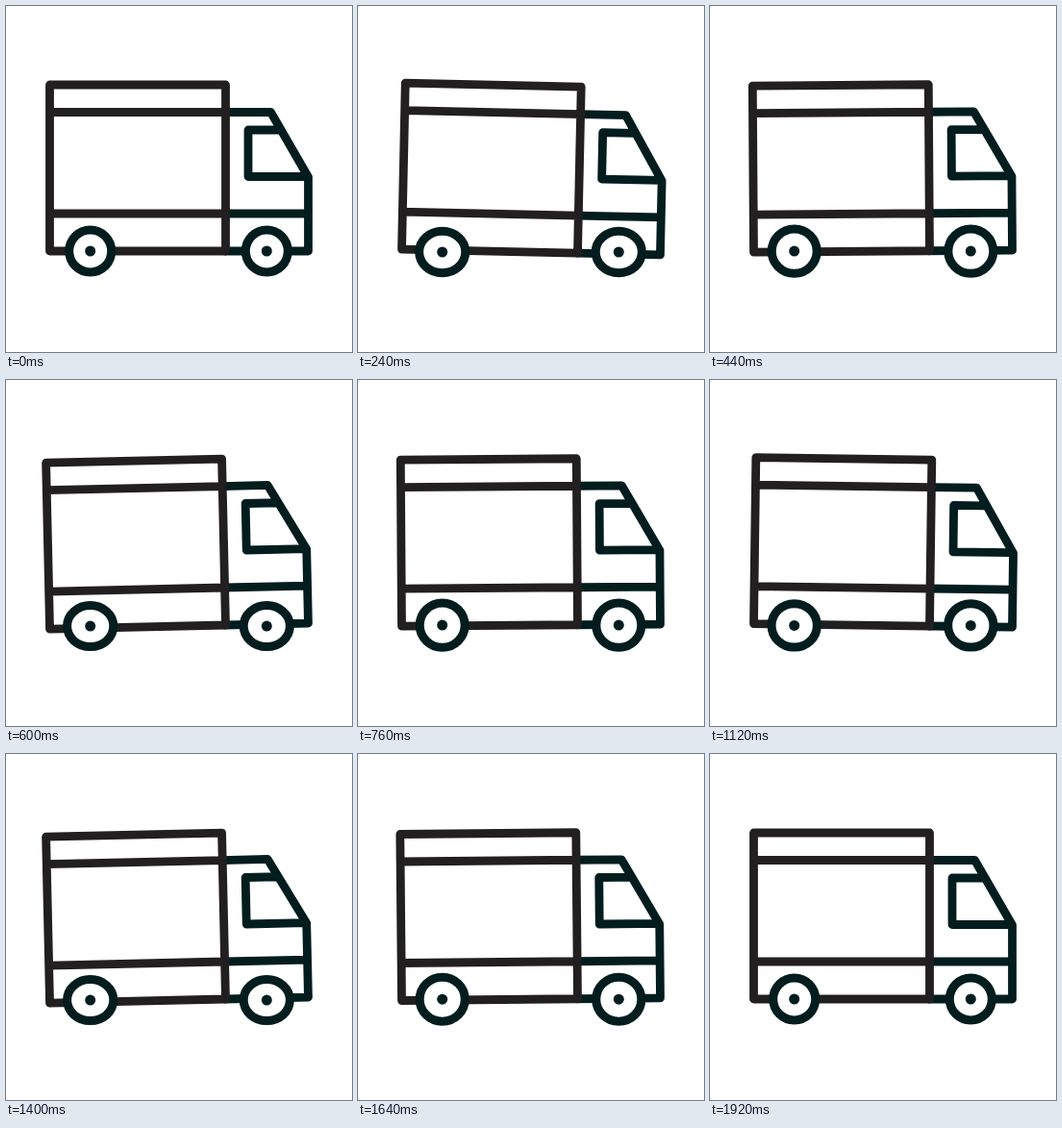
These frames come from a looping animation (360x360 px, 2 s). An HTML page:

```html
<!DOCTYPE html>
<html lang="en">
<head>
<meta charset="utf-8">
<title>Rocking truck</title>
<style>
html, body { margin: 0; width: 100%; height: 100%; overflow: hidden; background: #fff; }
svg { display: block; width: 100%; height: 100%; }
path { fill: none; stroke-width: 8.8; stroke-linejoin: round; stroke-linecap: round; }
.cab { stroke: #031d1e; }
.box { stroke: #221f20; }
.ring { fill: #fff; stroke: #031d1e; stroke-width: 9; }
.hub { fill: #031d1e; }
</style>
</head>
<body>
<svg viewBox="0 0 360 360">
  <g id="truck">
    <g id="body">
      <path class="cab" d="M228 110.5H275.5L314.5 178V255H228M228 216H314.5M285 129H252V177.5H314"/>
      <path class="box" d="M45.5 82H228.5V255H45.5ZM45.5 110.5H228.5M45.5 216H228.5"/>
    </g>
    <ellipse class="ring" cx="87.7" cy="255"/>
    <circle class="hub" cx="87.7" cy="255" r="5.5"/>
    <ellipse class="ring" cx="271.3" cy="255"/>
    <circle class="hub" cx="271.3" cy="255" r="5.5"/>
  </g>
</svg>
<script>
const LOOP = 2000, STEP = 40, REST = 1920, TILT = 1.3;
const truck = document.getElementById('truck');
const body = document.getElementById('body');
const rings = document.querySelectorAll('.ring');

// Time in ms and lean, where 1 is the full tilt
const keys = [[0, 0], [200, 1], [600, -1], [1000, 1], [1400, -1], [1840, 0], [LOOP, 0]];
const ease = u => (1 - Math.cos(Math.PI * u)) / 2;

function leanAt(t) {
  const i = keys.findIndex(k => k[0] > t);
  const [t0, a] = keys[i - 1], [t1, b] = keys[i];
  return a + (b - a) * ease((t - t0) / (t1 - t0));
}

function draw(now) {
  const t = Math.min(REST, Math.floor(now % LOOP / STEP) * STEP);
  const lean = leanAt(t), press = lean * lean;
  truck.setAttribute('transform', `translate(0 ${press * 1.1})`);
  body.setAttribute('transform', `rotate(${lean * TILT} 180 255)`);
  // Tyres are larger while rocking and flatten as the truck leans
  const r = t > 0 && t < REST ? 23.4 : 22;
  for (const ring of rings) {
    ring.setAttribute('rx', r + press * 0.7);
    ring.setAttribute('ry', r - press * 1.9);
  }
}

const start = performance.now();
function frame() {
  draw(performance.now() - start);
  requestAnimationFrame(frame);
}
frame();
</script>
</body>
</html>
```
